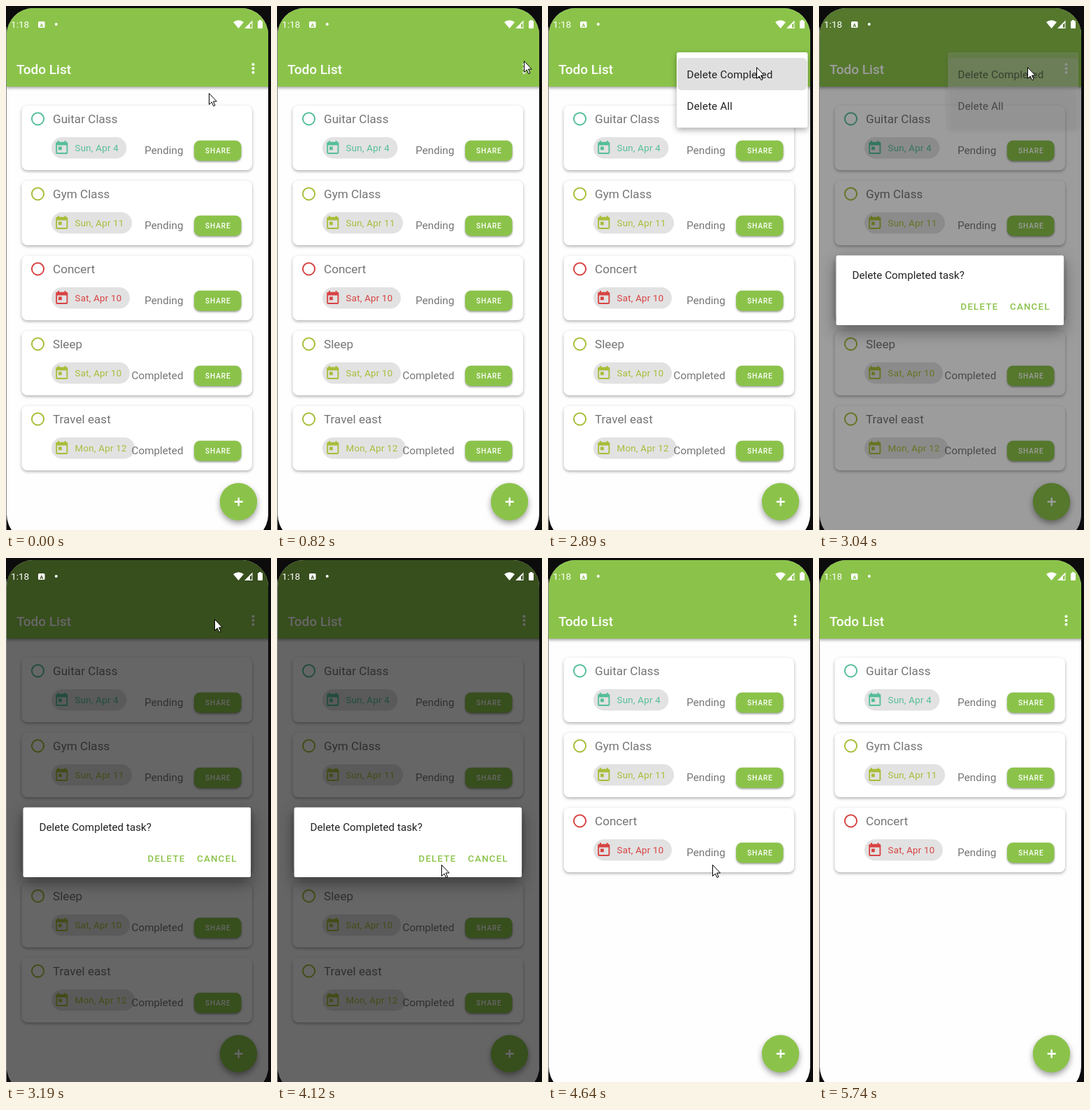
Write an HTML page with a canvas that moves like this. It is 379x747 px and loops after 6140 ms.

```html
<!DOCTYPE html>
<html lang="en">
<head>
<meta charset="utf-8">
<title>Todo List</title>
<style>
  html, body { margin: 0; width: 100%; height: 100%; overflow: hidden; background: #0c0c0c; }
  canvas { display: block; width: 379px; height: 747px; }
</style>
</head>
<body>
<canvas id="stage" width="379" height="747"></canvas>
<script>
const ctx = document.getElementById('stage').getContext('2d');
const LOOP = 6140;
const GREEN = '#8bc34a', TEAL = '#55bf98', OLIVE = '#a9bd39', RED = '#d84343';

const tasks = [
  { title: 'Guitar Class', date: 'Sun, Apr 4', color: TEAL },
  { title: 'Gym Class', date: 'Sun, Apr 11', color: OLIVE },
  { title: 'Concert', date: 'Sat, Apr 10', color: RED },
  { title: 'Sleep', date: 'Sat, Apr 10', color: OLIVE, done: true },
  { title: 'Travel east', date: 'Mon, Apr 12', color: OLIVE, done: true },
];

// Pointer stops: time, x, y. A stop without a place hides the pointer.
const pointerStops = [
  [0, 290, 124], [430, 265, 100], [550], [700, 358, 79], [820, 353, 78],
  [2040, 351, 78], [2190, 313, 87], [2340, 298, 87],
  [3580, 286, 190], [3700, 255, 394], [3850, 248, 413], [4000, 241, 427], [4120, 235, 437],
  [5350, 258, 500], [5470, 305, 622], [5590, 338, 717], [5740],
];

const menuStops = [
  [0, null],
  [1500, { left: 318, bottom: 88, dx: 66, dy: -44, fill: .18, ink: .3 }],
  [1620, { left: 260, bottom: 121, dx: 39, dy: -26, fill: .4, ink: .72 }],
  [1740, { left: 190, bottom: 170, dx: 5, dy: -4, fill: .88, ink: .95 }],
  [1890, { left: 184, bottom: 173.5, dx: 0, dy: 0, fill: 1, ink: 1, shadow: true }],
  [2890, { left: 184, bottom: 173.5, dx: 0, dy: 0, fill: 1, ink: 1, shadow: true, pressed: true }],
  [3040, { left: 184, bottom: 173.5, dx: 0, dy: 0, fill: .25, ink: .6, shadow: true, pressed: true }],
  [3190, null],
];

const dialogStops = [
  [0, null], [3040, { dim: .39, alpha: 1 }], [3190, { dim: .6, alpha: 1 }],
  [4520, { dim: .34, alpha: .3 }], [4640, null],
];

const eventIcon = new Path2D('M19 3h-1V1h-2v2H8V1H6v2H5c-1.11 0-2 .9-2 2v14c0 1.1.89 2 2 2h14c1.1 0 2-.9 2-2V5c0-1.1-.9-2-2-2zm0 16H5V8h14v11zM7 10h5v5H7v-5z');
const arrow = new Path2D('M.5.5V16.5L4.2 13L6.8 18.6L9 17.6L6.5 12H11.3Z');
const screen = new Path2D();
screen.roundRect(1, 3, 374, 760, 38);

const stopAt = (stops, t) => stops.findLast(s => s[0] <= t);

function box(x, y, w, h, r, fill) {
  ctx.fillStyle = fill;
  ctx.beginPath();
  ctx.roundRect(x, y, w, h, r);
  ctx.fill();
}

function disc(x, y, r, fill) {
  ctx.fillStyle = fill;
  ctx.beginPath();
  ctx.arc(x, y, r, 0, Math.PI * 2);
  ctx.fill();
}

function text(str, x, y, size, fill, { weight = 400, spacing = 0, align = 'left' } = {}) {
  ctx.font = `${weight} ${size}px Roboto, sans-serif`;
  ctx.letterSpacing = spacing + 'px';
  ctx.textAlign = align;
  ctx.fillStyle = fill;
  ctx.fillText(str, x, y);
  return ctx.measureText(str).width;
}

function shadowed(alpha, blur, dy, draw) {
  ctx.save();
  ctx.shadowColor = `rgba(0,0,0,${alpha})`;
  ctx.shadowBlur = blur;
  ctx.shadowOffsetY = dy;
  draw();
  ctx.restore();
}

function card({ title, date, color, done }, y) {
  shadowed(.32, 4, 1.8, () => box(22.5, y, 329.5, 92, 8, '#fff'));

  ctx.strokeStyle = color;
  ctx.lineWidth = 2;
  ctx.beginPath();
  ctx.arc(45.5, y + 18.8, 8.6, 0, Math.PI * 2);
  ctx.stroke();
  text(title, 67, y + 25, 17.14, '#757575');

  const chip = { spacing: .24 };
  const width = text(date, 99, y + 65, 13.33, color, chip);
  box(65, y + 45, 45 + width, 30.5, 15.25, '#e2e2e2');
  text(date, 98.5, y + 65, 13.33, color, chip);
  ctx.save();
  ctx.translate(68.4, y + 49);
  ctx.scale(.952, .952);
  ctx.fillStyle = color;
  ctx.fill(eventIcon);
  ctx.restore();

  text(done ? 'Completed' : 'Pending', 253.5, y + 69, 15.24, '#757575', { align: 'right' });
  shadowed(.4, 3, 1.5, () => box(269, y + 49.7, 67.5, 29, 8.5, GREEN));
  text('SHARE', 285, y + 68, 10.1, '#fff', { weight: 500, spacing: .9 });
}

function appBar(rippling) {
  shadowed(.35, 4, 1.5, () => box(0, 0, 379, 115, 0, GREEN));
  text('Todo List', 15, 96.5, 19.05, '#fff', { weight: 500 });
  if (rippling) disc(353.5, 88.5, 18.5, 'rgba(255,255,255,.2)');
  for (const dy of [-5.8, 0, 5.8]) disc(353.5, 89 + dy, 2, '#fff');
}

function addButton() {
  shadowed(.38, 8, 4, () => disc(332.5, 706.7, 26.7, GREEN));
  box(326.7, 705.6, 12, 2.4, 0, '#fff');
  box(331.5, 700.8, 2.4, 12, 0, '#fff');
}

function menu({ left, bottom, dx, dy, fill, ink, shadow, pressed }) {
  const top = 66, width = 371.5 - left;
  ctx.save();
  ctx.globalAlpha = fill;
  if (shadow) shadowed(.35, 8, 3, () => box(left, top, width, bottom - top, 3, '#fff'));
  else box(left, top, width, bottom - top, 1, '#fff');
  if (pressed) box(185, 74, 185.5, 46, 6, '#e0e0e0');
  ctx.beginPath();
  ctx.rect(left, top, width, bottom - top);
  ctx.clip();
  ctx.globalAlpha = ink;
  ['Delete Completed', 'Delete All'].forEach((label, i) =>
    text(label, 198.5 + dx, 102.5 + i * 45.7 + dy, 15.24, '#212121', { spacing: .14 }));
  ctx.restore();
}

function dialog(alpha) {
  ctx.save();
  ctx.globalAlpha = alpha;
  shadowed(.4, 22, 9, () => box(24.5, 355.5, 325.5, 99.5, 2.5, '#fff'));
  text('Delete Completed task?', 47.5, 389, 15.24, '#212121');
  const action = { weight: 500, spacing: 1.19 };
  text('DELETE', 202.5, 433.3, 13.33, GREEN, action);
  text('CANCEL', 273, 433.3, 13.33, GREEN, action);
  ctx.restore();
}

function shape(fill, ...points) {
  ctx.fillStyle = fill;
  ctx.beginPath();
  points.forEach(([x, y]) => ctx.lineTo(x, y));
  ctx.fill();
}

function statusBar(dim) {
  text('1:18', 7, 31.3, 13.6, '#fff');
  box(46, 22, 9.5, 9, 1.5, '#fff');
  const shade = [139, 195, 74].map(c => Math.round(c * (1 - dim)));
  text('A', 50.8, 29.5, 7.5, `rgb(${shade})`, { weight: 700, align: 'center' });
  disc(71.8, 26, 2, '#fff');

  ctx.fillStyle = '#fff';
  ctx.beginPath();
  ctx.moveTo(332.5, 32);
  ctx.lineTo(325, 23);
  ctx.quadraticCurveTo(332.5, 17.5, 340, 23);
  ctx.fill();
  shape('#fff', [341, 32], [352.5, 32], [352.5, 20.5]);
  shape(`rgb(${shade})`, [349, 30.8], [351.5, 30.8], [351.5, 24], [349, 26.5]);
  box(360, 21.3, 7, 10.7, 1, '#fff');
  box(362, 20, 3, 2, 0, '#fff');
}

function pointer(x, y) {
  ctx.save();
  ctx.translate(x, y);
  ctx.fillStyle = '#fff';
  ctx.strokeStyle = '#000';
  ctx.lineWidth = 1;
  ctx.fill(arrow);
  ctx.stroke(arrow);
  ctx.restore();
}

function draw(t) {
  const [, menuState] = stopAt(menuStops, t);
  const [, dialogState] = stopAt(dialogStops, t);
  const [, x, y] = stopAt(pointerStops, t);
  const dim = dialogState ? dialogState.dim : 0;

  box(0, 0, 379, 747, 0, '#0c0c0c');
  box(0, 30, 1, 717, 0, '#858585');

  ctx.save();
  ctx.clip(screen);
  box(0, 0, 379, 747, 0, '#fefefe');
  tasks.filter(task => t < 4640 || !task.done)
    .forEach((task, i) => card(task, 142 + i * 107));
  appBar(t >= 1350 && t < 1890);
  addButton();
  if (menuState) menu(menuState);
  box(0, 0, 379, 747, 0, `rgba(0,0,0,${dim})`);
  if (dialogState) dialog(dialogState.alpha);
  statusBar(dim);
  ctx.restore();

  if (x !== undefined) pointer(x, y);
}

const start = performance.now();
function tick() {
  draw((performance.now() - start) % LOOP);
  requestAnimationFrame(tick);
}
tick();
</script>
</body>
</html>
```
